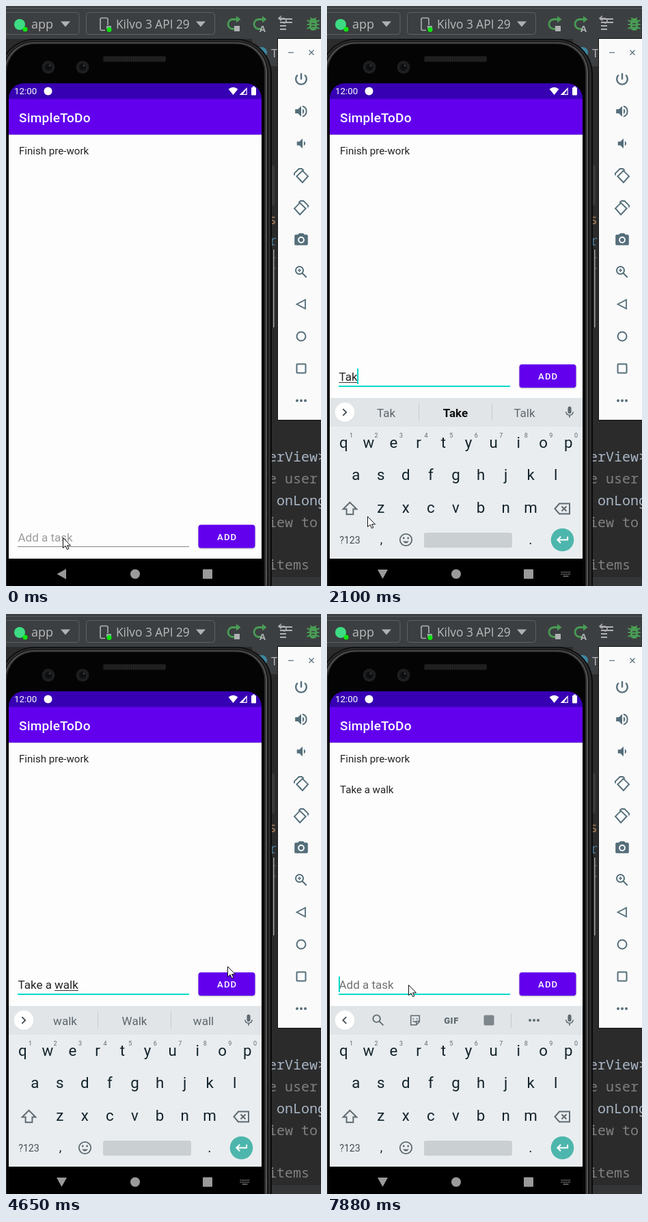
Recreate the animation shown at these times as an HTML page with a canvas. Size 461x848 px, loop 8 s.

```html
<!DOCTYPE html>
<html lang="en">
<head>
<meta charset="utf-8">
<title>To-do demo</title>
<style>
html, body { margin: 0; width: 100%; height: 100%; overflow: hidden; background: #2b2b2b; }
canvas { display: block; width: 461px; height: 848px; }
</style>
</head>
<body>
<canvas id="stage" width="461" height="848"></canvas>
<script>
const W = 461, H = 848, LOOP = 8000;
const screenCtx = document.getElementById('stage').getContext('2d');
const layer = () => Object.assign(document.createElement('canvas'), { width: W, height: H }).getContext('2d');
const backdrop = layer(), keys = layer();
let c = screenCtx;

const ROBOTO = 'Roboto, sans-serif', UI = '"Open Sans", sans-serif', MONO = '"Noto Sans Mono", monospace';
const PURPLE = '#6200ee', TEAL = '#03dac5', SLATE = '#546e7a', GREEN = '#499c54', GRAY = '#afb1b3', KEY = '#5f6a70';

// drawing helpers
function rect(x, y, w, h, color, r = 0) {
  c.fillStyle = color;
  c.beginPath();
  c.roundRect(x, y, w, h, r);
  c.fill();
}
function frame(x, y, w, h, color, width = 1, r = 0) {
  c.strokeStyle = color;
  c.lineWidth = width;
  c.beginPath();
  c.roundRect(x, y, w, h, r);
  c.stroke();
}
function disc(x, y, r, color) {
  c.fillStyle = color;
  c.beginPath();
  c.arc(x, y, r, 0, 7);
  c.fill();
}
function ring(x, y, r, color, width) {
  c.strokeStyle = color;
  c.lineWidth = width;
  c.beginPath();
  c.arc(x, y, r, 0, 7);
  c.stroke();
}
function text(s, x, y, size, color, { font = ROBOTO, weight = 400, align = 'left', gap = 0 } = {}) {
  c.font = `${weight} ${size}px ${font}`;
  c.letterSpacing = gap + 'px';
  c.textAlign = align;
  c.fillStyle = color;
  c.fillText(s, x, y);
  c.letterSpacing = '0px';
}
// an icon on a 24 unit grid, centred at x, y; a width makes it an outline
function icon(d, x, y, scale, color, width = 0) {
  c.save();
  c.translate(x, y);
  c.scale(scale, scale);
  c.translate(-12, -12);
  const path = new Path2D(d);
  if (width) {
    c.strokeStyle = color;
    c.lineWidth = width;
    c.stroke(path);
  } else {
    c.fillStyle = color;
    c.fill(path, 'evenodd');
  }
  c.restore();
}

// timing helpers
const pick = (t, steps) => steps.reduce((v, s) => (t >= s[0] ? s[1] : v), steps[0][1]);
const ease = k => k * k * (3 - 2 * k);
function stepMove(t, start, gap, count, a, b) {
  const k = ease(Math.min(1, (Math.floor((t - start) / gap) + 1) / count));
  return [a[0] + (b[0] - a[0]) * k, a[1] + (b[1] - a[1]) * k];
}

const POWER = 'M12 3v9.5M6.7 5.8a8 8 0 1 0 10.6 0';
const SPEAKER = 'M3 9v6h4l5 5V4L7 9zM14 8q5 4 0 8z';
const WAVE = 'M14 4.3a8 8 0 0 1 0 15.4';
const CAMERA = 'M9 2L7 4H4a2 2 0 0 0-2 2v12a2 2 0 0 0 2 2h16a2 2 0 0 0 2-2V6a2 2 0 0 0-2-2h-3L15 2zM7 12a5 5 0 1 0 10 0a5 5 0 1 0-10 0zM9 12a3 3 0 1 0 6 0a3 3 0 1 0-6 0z';
const LENS = 'M4 9.5a5.5 5.5 0 1 0 11 0a5.5 5.5 0 1 0-11 0M13.5 13.5l6.3 6.3';
const TURN = 'M14 4.5L22.5 13L14 22.5L5 13zM1.5 11.5V8.5L8.5 1.5H13L16 4';
const MIC = 'M9 5a3 3 0 0 1 6 0v6a3 3 0 0 1-6 0zM5 11h1.8a5.2 5.2 0 0 0 10.4 0H19a7 7 0 0 1-6 6.7V21h-2v-3.3A7 7 0 0 1 5 11z';
const RERUN = 'M14 19.5h-3a7 7 0 0 1 0-14h6';

function drawToolbar() {
  rect(0, 0, W, 48, '#3c3f41');
  rect(0, 3, W, 1, '#55585a');
  frame(-8, 9.5, 115, 32, '#5e6163', 1, 4);
  frame(117.5, 9.5, 188, 32, '#5e6163', 1, 4);
  for (const x of [87, 285]) icon('M5 7.5h14l-7 8z', x, 27, 1, GRAY);
  disc(20, 27, 8, '#3ddc84');
  disc(28, 34, 3.5, '#0be80b');
  text('app', 37, 33, 18, '#bbbbbb', { font: UI });
  frame(138, 17.5, 11, 18, GRAY, 1.6, 2);
  rect(145, 28, 9, 9, '#3c3f41');
  rect(147, 29, 7, 4, '#9aa7b0');
  disc(151, 34.5, 3.5, '#0be80b');
  text('Kilvo 3 API 29', 161, 33, 17.3, '#bbbbbb', { font: UI });

  for (const x of [333, 371]) {
    icon(RERUN, x, 26, 1, GREEN, 2.8);
    icon('M16 0.5l6.5 5l-6.5 5z', x, 26, 1, GREEN);
  }
  rect(334, 29, 8, 8, GRAY);
  text('A', 371, 38, 13, GRAY, { font: UI, weight: 700 });
  for (let i = 0; i < 4; i++) rect(401, 18 + i * 5, i < 2 ? 18 : 9, 2, GRAY);
  icon('M11 14h7q4 0 4 3.5q0 3.5-4 3.5M15 10.5l-4 3.5l4 3.5', 400, 16, 1, GRAY, 1.6);
  rect(444, 18, 11, 18, GREEN, 5);
  icon('M3 7l5 2M3 13h5M3 19l5-2M21 7l-5 2M21 13h-5M21 19l-5-2M8 3l3 4M16 3l-3 4', 449.5, 26, 1, GREEN, 2);
  rect(447, 25, 5, 1.5, '#3c3f41');
  rect(447, 29, 5, 1.5, '#3c3f41');
}

function drawEditor() {
  rect(0, 48, W, H, '#2b2b2b');
  rect(360, 48, W, 40, '#3c3f41');
  disc(374, 68, 8, '#3e86a0');
  text('T', 388, 75, 17, '#bbbbbb', { font: UI });
  text('s', 384, 319, 20, '#a9825c', { font: MONO });
  text('r', 384, 350, 20, '#4d7a97', { font: MONO });
  text('(', 386, 381, 20, '#4d7a97', { font: MONO });
  const rows = [['erView>', 666, '#a9b7c6'], ['e user', 698, '#808080'], [' onLong', 730, '#a9b7c6'],
    ['iew to', 762, '#808080'], ['items', 824, '#808080']];
  for (const [s, y, color] of rows) text(s, 384, y, 20, color, { font: MONO });
  rect(388, 835, 80, 13, '#333537');
}

function drawPhone() {
  rect(385, 233, 8, 58, '#3a3a3a', 2);
  rect(385, 355, 8, 116, '#202020', 2);
  rect(391, 356, 1.5, 114, '#a8a8a8');
  // nested outlines make the metal rim
  const rim = [[0, '#0a0a0a'], [2, '#2c2c2c'], [5, '#161616'], [7, '#545454'], [9, '#2a2a2a'], [11, '#040404']];
  for (const [d, color] of rim) rect(-10 + d, 48 + d * 0.7, 399 - 2 * d, 900, color, 52 - d);
  rect(142, 73, 92, 9, '#191919', 2);
  for (let x = 144; x < 233; x += 3) for (let y = 75; y < 81; y += 3) rect(x, y, 1.5, 1.5, '#343434');
  for (const x of [62, 112]) {
    disc(x, 89.5, 9.5, '#1c1e20');
    disc(x, 89.5, 5, '#0c0e10');
    disc(x + 2, 87, 1.5, '#3a3f44');
  }
}

function drawScreen() {
  c.save();
  c.beginPath();
  c.roundRect(4, 113, 370, 735, [22, 22, 0, 0]);
  c.clip();
  rect(4, 113, 370, 23, '#3700b3');
  rect(4, 136, 370, 52, PURPLE);
  rect(4, 188, 370, 620, '#fdfdfd');
  rect(4, 188, 370, 1, '#dcdcdc');
  rect(4, 808, 370, 40, '#000');
  c.restore();
  text('12:00', 12, 129, 13.3, '#fff');
  disc(61.5, 124.5, 6, '#fff');
  icon('M12 21L0.5 7Q12-2 23.5 7z', 332.5, 124.5, 0.6, '#fff');
  icon('M2 21.5H21V2.5zM11 19.5h8V8z', 347.5, 124.5, 0.58, '#fff');
  rect(359, 119, 7, 11.5, '#fff', 1);
  rect(361, 117.5, 3, 2, '#fff');
  text('SimpleToDo', 19, 169.5, 19, '#fff', { weight: 500, gap: 0.24 });
  text('Finish pre-work', 19, 217, 15.1, '#222');
}

function drawPanel() {
  rect(397, 47, 70, 559, '#111');
  rect(398, 48, 70, 557, '#fafafa');
  rect(413, 67.5, 8, 1.2, SLATE);
  icon('M5 5l14 14M19 5L5 19', 447, 68, 0.5, SLATE, 2.4);
  icon(POWER, 432, 107, 0.98, SLATE, 2.4);
  icon(SPEAKER, 432, 154, 0.98, SLATE);
  icon(WAVE, 432, 154, 0.98, SLATE, 2);
  icon(SPEAKER, 434, 201, 0.92, SLATE);
  icon(TURN, 432, 248, 0.95, SLATE, 2);
  c.save();
  c.translate(864, 0);
  c.scale(-1, 1);
  icon(TURN, 432, 295, 0.95, SLATE, 2);
  c.restore();
  icon(CAMERA, 432, 342, 0.98, SLATE);
  icon(LENS, 432, 389, 1, SLATE, 2);
  icon('M7 9.5h5M9.5 7v5', 432, 389, 1, SLATE, 1.4);
  icon('M5.5 12L18 5.5v13z', 432, 436, 1, SLATE, 1.8);
  ring(432, 483, 6.5, SLATE, 2);
  frame(425.5, 523.5, 13, 13, SLATE, 2, 1);
  for (const x of [426, 432, 438]) disc(x, 577, 2, SLATE);
}

function paintBackdrop() {
  c = backdrop;
  drawEditor();
  drawToolbar();
  drawPhone();
  drawScreen();
  drawPanel();
}

// everything that moves
const TYPED = [[0, ''], [1730, 'T'], [1970, 'Ta'], [2100, 'Tak'], [2220, 'Take'], [2350, 'Take '], [2480, 'Take a'],
  [2610, 'Take a '], [2890, 'Take a w'], [3010, 'Take a wa'], [3170, 'Take a wal'], [3320, 'Take a walk'], [5870, '']];
const HINTS = [[0, ''], [1730, 'T,The,To'], [1970, 'Ta,Take,Talk'], [2100, 'Tak,Take,Talk'], [2220, 'Take,Taken,Takes'],
  [2350, 'care,a,the'], [2480, 'a,an,and'], [2610, 'look,break,nap'], [2890, 'w,with,was'], [3010, 'wa,was,walk'],
  [3170, 'wal,walk,wall'], [3320, 'walk,Walk,wall'], [5990, '']];
const CARET = [[0, 0], [540, 1], [1450, 0], [1730, 1], [3750, 0], [4140, 1], [4650, 0], [5200, 1],
  [6370, 0], [6930, 1], [7360, 0], [7760, 1]];
const KEYS_ALPHA = [[0, 0], [780, 0.2], [920, 0.6], [1070, 0.95], [1190, 1]];
const KEYS_DROP = [[0, 47], [920, 46], [1070, 10], [1190, 0]];
const NAV_TURN = [[0, 0], [780, -25], [920, -70], [1070, -90]];
const RIPPLE = [[0, 0], [5340, 22], [5470, 60], [5990, 0]];

function pointer(t) {
  if (t < 120) return [83, 777];
  if (t < 240) return [74, 779];
  if (t < 1450) return [65, 780];
  if (t < 3750) return [59, 746];
  if (t < 4790) return stepMove(t, 3750, 128.5, 8, [59, 746], [324, 515]);
  if (t < 4910) return [330, 531];
  if (t < 6650) return [330, 533];
  return stepMove(t, 6650, 141, 8, [330, 533], [119, 542]);
}

function drawButton(wave) {
  c.save();
  c.shadowColor = 'rgba(0,0,0,.3)';
  c.shadowBlur = wave ? 6 : 2;
  c.shadowOffsetY = wave ? 3 : 1;
  rect(281.5, 524, 83, 34, PURPLE, 4);
  c.restore();
  if (wave) {
    c.save();
    c.beginPath();
    c.roundRect(281.5, 524, 83, 34, 4);
    c.clip();
    disc(331, 538, wave, 'rgba(255,255,255,.24)');
    c.restore();
  }
  text('ADD', 309, 546, 13.2, '#fff', { weight: 500, gap: 1.1 });
}

function drawField(t) {
  const typed = pick(t, TYPED), size = 17;
  c.save();
  c.translate(0, t >= 780 ? 0 : 235);
  if (t >= 540) rect(17, 555, 251, 2, TEAL);
  else rect(17, 555, 251, 1, '#858585');
  if (typed) {
    text(typed, 17.5, 548, size, '#222');
    const word = typed.split(' ').pop();
    const end = c.measureText(typed).width, w = c.measureText(word).width;
    if (w) rect(17.5 + end - w, 550, w, 1, '#333');
  } else {
    text('Add a task', 17.5, 548, size, t >= 7880 ? '#717171' : '#9c9c9c');
  }
  if (pick(t, CARET)) rect(17 + (typed ? c.measureText(typed).width : 0), 530, 2, 23, TEAL);
  c.translate(0, t >= 780 ? 0 : -0.5);
  drawButton(pick(t, RIPPLE));
  c.restore();
}

function drawNav(t) {
  c.save();
  c.translate(81.5, 830.5);
  c.rotate(pick(t, NAV_TURN) * Math.PI / 180);
  icon('M5 12L18.5 4.5v15z', 0, 0, 1, '#9a9a9a');
  c.restore();
  disc(189, 830.5, 7, '#9a9a9a');
  rect(288, 823.5, 14, 14, '#9a9a9a', 1);
  if (t < 780) return;
  for (let i = 0; i < 12; i++) rect(342.5 + (i % 6) * 2.4, 827 + Math.floor(i / 6) * 3, 1.4, 1.5, '#8a8a8a');
  rect(345.5, 833, 8, 1.2, '#8a8a8a');
}

function drawStrip(words) {
  rect(4, 573, 370, 42, '#e1e5e8');
  disc(26, 594.5, 14.5, '#d2d6d9');
  disc(26, 594, 14.3, '#fff');
  icon(words ? 'M9 6.5l5.5 5.5L9 17.5' : 'M14.5 6.5L9 12l5.5 5.5', 26, 594, 0.9, '#444d52', 2);
  icon(MIC, 355, 594, 0.85, KEY);
  if (words) {
    const list = words.split(',');
    const sure = /^[A-Z]/.test(list[0]);
    list.forEach((w, i) => {
      const bold = sure && i === 1;
      text(w, [86.5, 188, 289][i], 600.5, 17, bold ? '#101010' : '#5c666c', { weight: bold ? 700 : 400, align: 'center' });
    });
    for (const x of [134, 241]) rect(x, 582, 1, 24, '#c5cacd');
    return;
  }
  icon(LENS, 75, 594, 0.95, KEY, 2);
  icon('M5 4h14v10l-5 5H5zM19 13h-5v6M9 8v2M15 8v2M8.5 12.5q3 3 6 0', 129, 594.5, 0.9, KEY, 1.7);
  text('GIF', 182, 598.5, 13, KEY, { weight: 900, align: 'center', gap: 0.6 });
  rect(229.5, 586.5, 15, 15, '#7d868b', 2);
  rect(269, 584, 1, 21, '#c5cacd');
  for (const x of [297, 303, 309]) disc(x, 594, 2, KEY);
}

function drawKeys(words) {
  c = keys;
  c.clearRect(0, 0, W, H);
  rect(4, 573, 370, 235, '#e9edf0');
  drawStrip(words);
  const ink = '#13232b', mid = { align: 'center' };
  const row = (s, x, y) => [...s].forEach((ch, i) => text(ch, x + i * 36.55, y, 22.3, ink, mid));
  row('qwertyuiop', 24.3, 646);
  row('asdfghjkl', 42.3, 693);
  row('zxcvbnm', 78.8, 741);
  [...'1234567890'].forEach((ch, i) => text(ch, 35.5 + i * 36.55, 631, 9, KEY, mid));
  icon('M12 2.5L22 12.5H17V20.5H7V12.5H2z', 33.5, 735, 0.98, KEY, 2);
  icon('M8 4.5H23V19.5H8L1.5 12zM11.5 8.5l7 7M18.5 8.5l-7 7', 344, 735, 1, KEY, 2);
  text('?123', 33.5, 785.5, 14.2, '#444f55', mid);
  text(',', 79.5, 786, 18, ink, mid);
  text('.', 298, 787, 20, ink, mid);
  ring(115.5, 780.5, 8.7, KEY, 1.8);
  disc(112.3, 778, 1.4, KEY);
  disc(118.7, 778, 1.4, KEY);
  icon('M7.5 14q4.5 6 9 0z', 115.5, 780.5, 1, KEY);
  rect(142, 770, 129, 22, '#cacfd2', 3);
  disc(344.5, 780.5, 16.8, '#4db6ac');
  icon('M20 7v5H5M9.5 7L4.5 12l5 5', 344.5, 780.5, 0.95, '#fff', 2.1);
  c = screenCtx;
}

function drawPointer([x, y]) {
  const p = new Path2D('M0 0V15L3.6 11.8L6 17L8.4 16L6 11.300H11z');
  c.save();
  c.translate(Math.round(x) + 0.5, Math.round(y) + 0.5);
  c.fillStyle = '#fff';
  c.strokeStyle = '#111';
  c.lineWidth = 1;
  c.fill(p);
  c.stroke(p);
  c.restore();
}

function draw(t) {
  c = screenCtx;
  c.drawImage(backdrop.canvas, 0, 0);
  if (t >= 5870) text('Take a walk', 19, 262, 15.1, '#222');
  drawField(t);
  drawNav(t);
  const alpha = pick(t, KEYS_ALPHA);
  if (alpha) {
    drawKeys(pick(t, HINTS));
    c.globalAlpha = alpha;
    c.drawImage(keys.canvas, 0, pick(t, KEYS_DROP));
    c.globalAlpha = 1;
  }
  drawPointer(pointer(t));
}

paintBackdrop();
const start = performance.now();
function tick(now) {
  draw(Math.max(0, now - start) % LOOP);
  requestAnimationFrame(tick);
}
tick(start);
</script>
</body>
</html>
```
